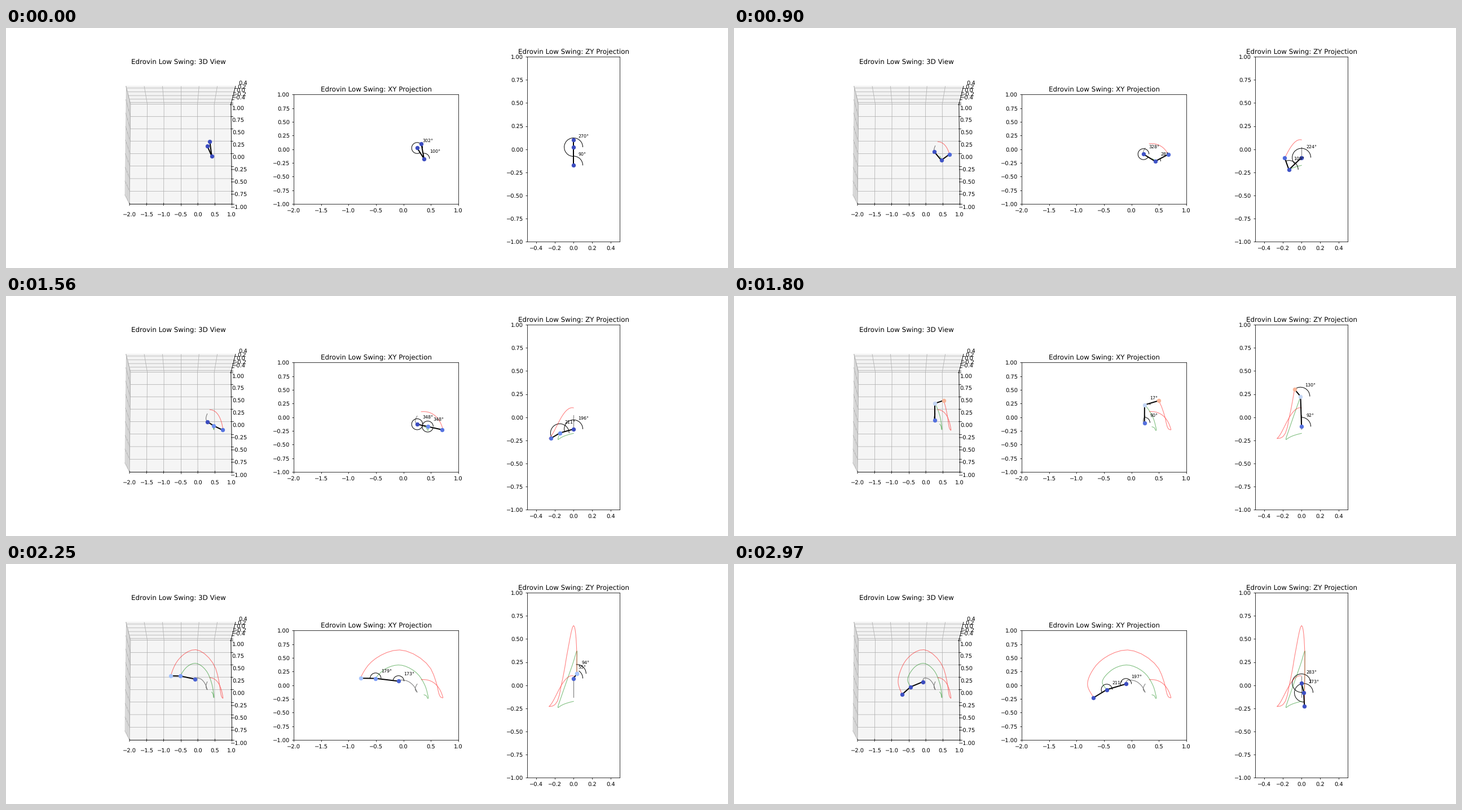
These frames come from a looping animation (1280x427 px, 3 s). A matplotlib script:

```python
from math import comb

import numpy as np
import matplotlib.pyplot as plt
from matplotlib.animation import FuncAnimation
from matplotlib.patches import Arc

FRAMES, INTERVAL = 100, 30
LOAD_MS = 1500
DPI = 1280 / 18
NAME = "Edrovin Low Swing"
TOP_SPEED = 0.18
TRAIL_COLORS = ("k", "g", "r")
plt.rcParams["text.hinting"] = "none"


def bezier(points, u):
    n = len(points) - 1
    return sum(comb(n, k) * (1 - u) ** (n - k) * u ** k * np.array(p)
               for k, p in enumerate(points))


def spline(points, progress):
    """Smooth curve through points; progress 0..1 runs along its length."""
    points = np.array(points, float)
    chords = np.linalg.norm(np.diff(points, axis=0), axis=1)
    knots = np.r_[0, np.cumsum(chords)]
    slopes = np.gradient(points, knots, axis=0)
    s = progress * knots[-1]
    k = np.clip(np.searchsorted(knots, s[:, 0], side="right") - 1, 0, len(chords) - 1)
    h = chords[k][:, None]
    u = (s - knots[k][:, None]) / h
    rise = u * u * (3 - 2 * u)
    return (points[k] * (1 - rise) + points[k + 1] * rise
            + h * u * (1 - u) * (slopes[k] * (1 - u) - slopes[k + 1] * u))


def motion(load, swing, peak_ms, spread_ms):
    """Slow loading along a Bezier, then a swing that bursts at peak_ms and dies away."""
    t = np.arange(FRAMES)[:, None] * INTERVAL
    burst = np.exp(-np.exp((peak_ms - t) / spread_ms))
    tip = load[-1]
    return bezier(load, np.clip(t / LOAD_MS, 0, 1)) + spline([tip, *swing], burst) - tip


shoulder = motion(
    load=[(.25, .022, 0), (.185, -.079, 0), (.222, -.096, 0), (.25, -.129, 0)],
    swing=[(.2, -.03, 0), (.05, .083, 0), (-.09, .074, 0), (-.1, .022, 0)],
    peak_ms=1944, spread_ms=140)
elbow = motion(
    load=[(.375, -.175, 0), (.462, -.202, -.122), (.404, -.228, -.146), (.462, -.25, -.175)],
    swing=[(.39, 0, -.089), (.241, .223, -.011), (-.08, .37, .036),
           (-.377, .265, .036), (-.53, .04, .033), (-.442, -.093, .023)],
    peak_ms=1821, spread_ms=240)
wrist = motion(
    load=[(.325, .101, 0), (.647, .129, -.121), (.712, -.205, -.203), (.722, -.232, -.27)],
    swing=[(.69, -.225, -.225), (.595, .06, -.12), (.498, .302, -.076), (-.07, .645, 0),
           (-.665, .337, .035), (-.8, 0, .034), (-.685, -.242, .031)],
    peak_ms=1872, spread_ms=211)

# Indexed as joint, coordinate, frame.
joints = np.array([shoulder.T, elbow.T, wrist.T])
steps = np.linalg.norm(np.diff(joints, axis=2), axis=1)
speeds = np.hstack([np.zeros((3, 1)), steps]) / TOP_SPEED


class View:
    """Arm, joints and trails drawn along the chosen coordinates."""

    def __init__(self, ax, dims, label_dx=None):
        self.dims, self.label_dx = list(dims), label_dx
        empty = [[]] * len(dims)
        self.trails = [ax.plot(*empty, color=c, lw=1.1, alpha=0.5)[0] for c in TRAIL_COLORS]
        self.arm, = ax.plot(*empty, color="k", lw=2)
        self.dots = [ax.plot(*empty, "o", ms=6.5)[0] for _ in joints]
        self.arcs, self.labels = [], []
        if label_dx is not None:
            for _ in range(2):
                self.arcs.append(ax.add_patch(Arc((0, 0), 0.2, 0.2, lw=1)))
                self.labels.append(ax.text(0, 0, "", fontsize=8))

    def place(self, line, points):
        if len(points) == 3:
            line.set_data_3d(*points)
        else:
            line.set_data(*points)

    def update(self, i):
        paths = joints[:, self.dims]
        pose = paths[:, :, i]
        self.place(self.arm, pose.T)
        for j in range(len(joints)):
            self.place(self.trails[j], paths[j, :, :i + 1])
            self.place(self.dots[j], pose[j][:, None])
            self.dots[j].set_color(plt.cm.coolwarm(float(speeds[j, i])))
        for j, (arc, label) in enumerate(zip(self.arcs, self.labels)):
            dx, dy = pose[j + 1] - pose[j]
            angle = np.degrees(np.arctan2(dy, dx)) % 360
            arc.set_center(tuple(pose[j]))
            arc.theta1, arc.theta2 = 0, angle
            label.set_position((pose[j][0] + self.label_dx, pose[j][1] + 0.1))
            label.set_text(f"{angle:.0f}°")


fig = plt.figure(figsize=(18 + 1e-6, 427 / DPI + 1e-6), dpi=DPI)

ax3d = fig.add_subplot(131, projection="3d")
ax3d.set(xlim=(-2, 1), ylim=(-1, 1), zlim=(-0.5, 0.5), title=f"{NAME}: 3D View")
ax3d.view_init(elev=80, azim=-90)

ax_xy = fig.add_subplot(132, aspect="equal")
ax_xy.set(xlim=(-2, 1), ylim=(-1, 1), title=f"{NAME}: XY Projection")

ax_zy = fig.add_subplot(133, aspect="equal")
ax_zy.set(xlim=(-0.5, 0.5), ylim=(-1, 1), title=f"{NAME}: ZY Projection")

views = [View(ax3d, (0, 1, 2)), View(ax_xy, (0, 1), 0.1), View(ax_zy, (2, 1), 0.05)]


def update(i):
    for view in views:
        view.update(i)
    return []


anim = FuncAnimation(fig, update, frames=FRAMES, interval=INTERVAL,
                     init_func=lambda: update(0), repeat=True, repeat_delay=0)
plt.show()
```
